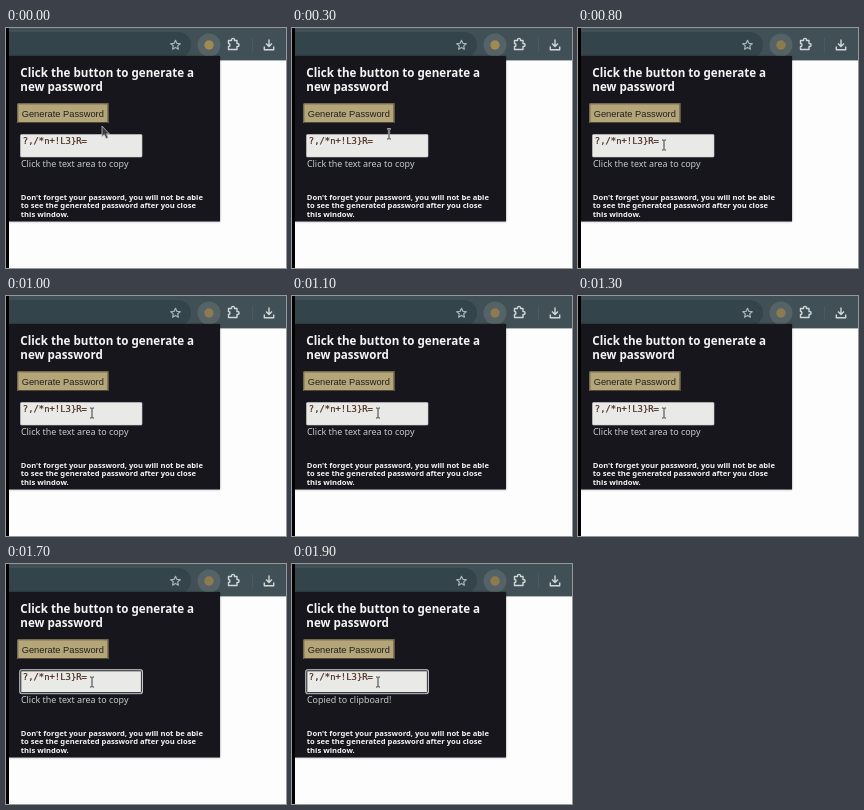
An HTML page that plays this animation: 280 px wide and 240 px high, repeating every 2.8 s.

```html
<!DOCTYPE html>
<html lang="en">
<head>
<meta charset="utf-8">
<title>Password generator popup</title>
<style>
html, body { margin: 0; width: 100%; height: 100%; overflow: hidden; background: #fdfdfd; }
svg { display: block; width: 280px; height: 240px; }
text { white-space: pre; }
.sans { font-family: "Noto Sans", sans-serif; fill: #f4f5f5; }
.title { font-size: 11.6px; font-weight: 700; }
.hint { font-size: 8.95px; fill: #c5ccca; }
.note { font-size: 7.62px; font-weight: 700; }
.label { font: 9.3px "Liberation Sans", Arial, sans-serif; fill: #20201c; }
.password { font: 8.9px "DejaVu Sans Mono", monospace; fill: #4a2a18; stroke: #4a2a18; stroke-width: .2; }
.icon { fill: none; stroke: #d0d8da; stroke-width: 1.4; stroke-linejoin: round; }
.star { stroke: #a9b5b9; stroke-width: 1.2; }

.anim { animation: 2800ms step-end infinite; }
.pointer { animation-name: move; }
.arrow { animation-name: until-text; }
.beam { animation-name: over-text; }
.focus { animation-name: focus; }
.before { animation-name: before-copy; }
.after { animation-name: after-copy; }
.badge { animation-name: dim; }

@keyframes move {
  0% { transform: translate(96px, 98px); animation-timing-function: steps(3); }
  10.71% { transform: translate(97px, 106px); animation-timing-function: steps(3); }
  21.42% { transform: translate(86px, 117px); }
  57.14%, 100% { transform: translate(86px, 118px); }
}
@keyframes until-text { 0% { opacity: 1; } 10.71%, 100% { opacity: 0; } }
@keyframes over-text { 0% { opacity: 0; } 10.71%, 100% { opacity: 1; } }
@keyframes focus { 0% { opacity: 0; } 60.71%, 100% { opacity: 1; } }
@keyframes before-copy { 0% { opacity: 1; } 67.85%, 100% { opacity: 0; } }
@keyframes after-copy { 0% { opacity: 0; } 67.85%, 100% { opacity: 1; } }
@keyframes dim { 0% { fill: #a08b55; } 25%, 100% { fill: #8c7b4f; } }
</style>
</head>
<body>
<svg viewBox="0 0 280 240">
  <defs>
    <filter id="shadow" x="-5%" y="-5%" width="112%" height="112%">
      <feDropShadow dx="0" dy="0" stdDeviation=".8" flood-opacity=".4"/>
    </filter>
    <path id="caret" d="M-2-5h1.500l.5.500.500-.5H2M0-4.500v9M-2 5h1.500l.5-.5.500.5H2"/>
  </defs>

  <!-- Browser toolbar -->
  <rect x="3" width="277" height="32.400" fill="#405056"/>
  <path d="M3 4H172a13 13 0 0 1 0 26H3z" fill="#34444b"/>
  <path class="icon star" d="M169.500 12.300l1.350 3.050 3.350.35-2.500 2.200.7 3.250-2.900-1.700-2.900 1.700.7-3.250-2.500-2.200 3.350-.35z"/>
  <circle cx="203" cy="17" r="11.500" fill="#566366"/>
  <circle class="anim badge" cx="203" cy="17" r="4.700"/>
  <path class="icon" d="M222.500 12.500h3v-.6a1.500 1.500 0 0 1 3 0v.6h2.500v3h.6a1.500 1.500 0 0 1 0 3h-.6v3h-8.500v-3a1.500 1.500 0 0 0 0-3z"/>
  <path d="M246.500 10v14" stroke="#4b5a60"/>
  <path class="icon" d="M263 11.500v7m-3-3 3 3 3-3M258.300 18.500v3.300h9.400v-3.300"/>

  <!-- Extension popup -->
  <rect x="3" y="28" width="211" height="165.500" fill="#15191e" filter="url(#shadow)"/>
  <g class="sans title">
    <text x="14.300" y="48.500">Click the button to generate a</text>
    <text x="14.300" y="62.500">new password</text>
  </g>

  <rect x="11.500" y="75.500" width="91" height="19.500" fill="#b5a67a"/>
  <path d="M12 95V76H102.500" fill="none" stroke="#827755"/>
  <path d="M12 94.500h90V76" fill="none" stroke="#4f4936"/>
  <text class="label" x="15.700" y="88.800">Generate Password</text>

  <rect x="14.500" y="106.500" width="121.500" height="22.500" rx="1" fill="#e9e9e8" stroke="#cfcfcd" stroke-width=".6"/>
  <g class="anim focus" fill="none">
    <rect x="13.700" y="105.700" width="122.800" height="24" rx="1.500" stroke="#c3c6c7"/>
    <rect x="14.800" y="106.800" width="120.600" height="21.800" rx="1" stroke="#2b2e31"/>
  </g>
  <text class="password" x="16.800" y="115.800">?,/*n+!L3}R=</text>

  <text class="sans hint anim before" x="14.900" y="139.300">Click the text area to copy</text>
  <text class="sans hint anim after" x="14.900" y="139.300">Copied to clipboard!</text>

  <g class="sans note">
    <text x="14.800" y="171.500">Don't forget your password, you will not be able</text>
    <text x="14.800" y="180.200">to see the generated password after you close</text>
    <text x="14.800" y="188.900">this window.</text>
  </g>

  <g class="anim pointer">
    <path class="anim arrow" d="M0 0v10.500l2.300-2 1.900 4 1.900-.9-1.800-3.800h3z" fill="#3a3c3e" stroke="#b9bab8" stroke-width=".8"/>
    <g class="anim beam" fill="none">
      <use href="#caret" stroke="#f2f2f2" stroke-width="2.200" opacity=".85"/>
      <use href="#caret" stroke="#333"/>
    </g>
  </g>

  <!-- Dark desktop edge -->
  <rect width="3" height="240" fill="#000"/>
</svg>
</body>
</html>
```
